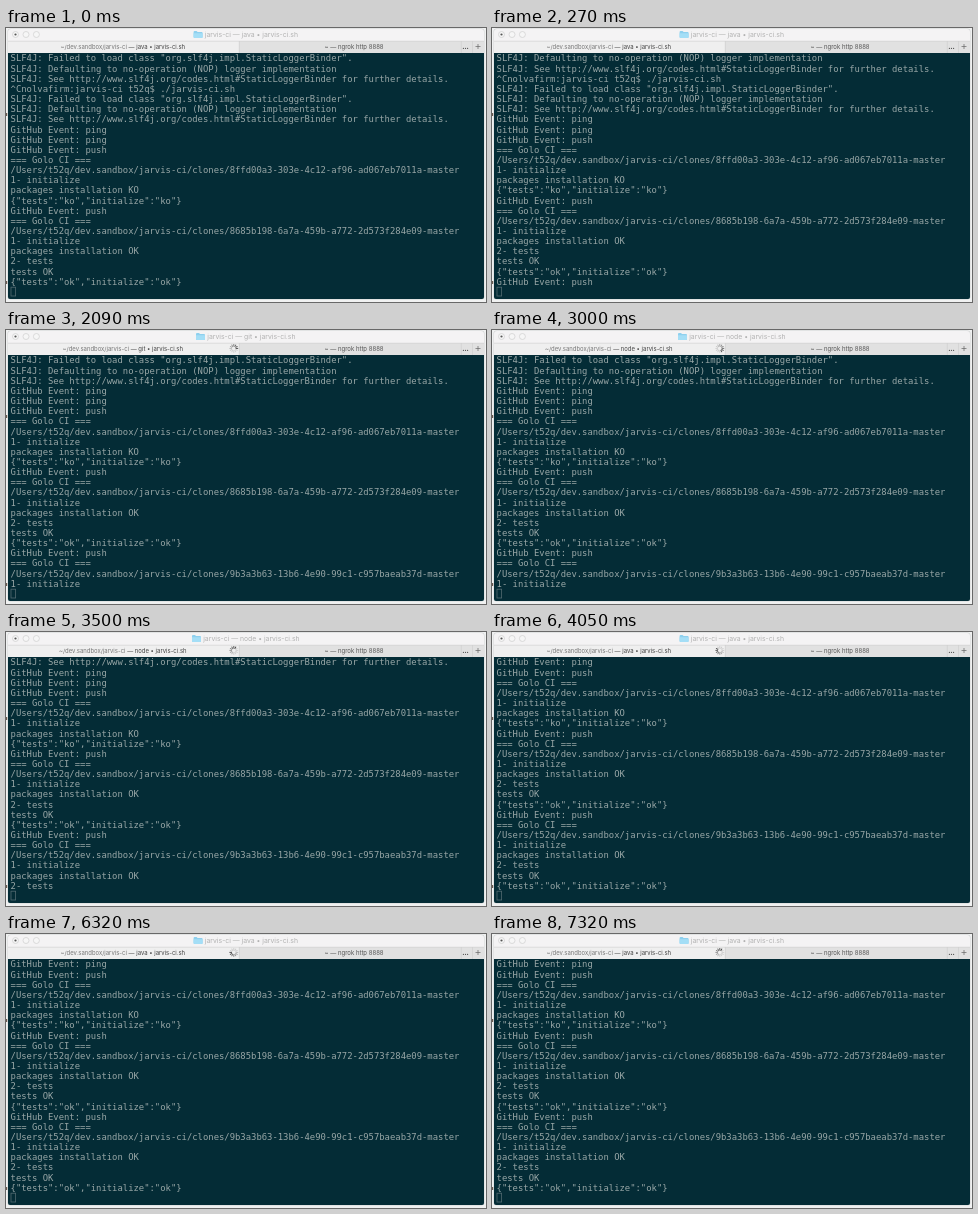
These frames come from a looping animation (480x274 px, 7370 ms). An HTML page:

```html
<!DOCTYPE html>
<html lang="en">
<head>
<meta charset="utf-8">
<title>Terminal</title>
<style>
  html, body { margin: 0; width: 100%; height: 100%; overflow: hidden; background: #f0f1f1; }
  svg { display: block; width: 480px; height: 274px; }
  .ui { font-family: Inter, "Liberation Sans", sans-serif; text-anchor: middle; }
  .mono { font: 8.88px "DejaVu Sans Mono", monospace; fill: #99a7a7; }
</style>
</head>
<body>
<svg id="stage" viewBox="0 0 480 274">
  <rect width="480" height="274" fill="#f0f1f1"/>
  <rect x="1.5" y="0.5" width="477" height="271" rx="3" fill="#d3d6d6"/>
  <path d="M0 85h1.2v3H0zM0 253h1.2v3H0z" fill="#6b5a50"/>
  <path d="M2 14V4q0-3 3-3h470q3 0 3 3v10z" fill="#f4f3f4"/>
  <g id="lights" fill="#f6f6f6" stroke="#cfcfcf" stroke-width=".7"></g>
  <circle cx="9.5" cy="6.5" r="1.1" fill="#555"/>
  <rect x="2" y="13" width="476" height="12" fill="#e1e1e1"/>
  <rect x="2" y="13" width="231" height="12" fill="#efefef"/>
  <path d="M2 13.2H478M233.3 13V25M455.3 13V25M466.5 13V25" stroke="#cdcdcd" stroke-width=".6"/>
  <path d="M2 25H478V269q0 2-2 2H4q-2 0-2-2z" fill="#042c36"/>
  <g id="folder">
    <path d="M0 1q0-1 1-1h2l1 1h4q1 0 1 1v4q0 1-1 1H1q-1 0-1-1z" fill="#8ed0ee"/>
    <path d="M0 2.2h9V6q0 1-1 1H1q-1 0-1-1z" fill="#a4def6"/>
  </g>
  <text id="title" class="ui" x="245.4" y="9" font-size="6.85" fill="#b2b2b2"></text>
  <text class="ui" x="116.8" y="20.9" font-size="5.95" fill="#444"><tspan fill="#777">~/dev.sandbox/jarvis-ci</tspan><tspan id="tab"></tspan></text>
  <text class="ui" x="348.1" y="20.9" font-size="6" fill="#555">~ — ngrok http 8888</text>
  <g fill="#444">
    <circle cx="457.4" cy="20.3" r=".6"/><circle cx="459.5" cy="20.3" r=".6"/><circle cx="461.6" cy="20.3" r=".6"/>
  </g>
  <path d="M469.5 18.5h5M472 16v5" stroke="#666" stroke-width=".7"/>
  <g id="spinner" transform="translate(227.8 18.4)" stroke="#333" stroke-width=".95" stroke-linecap="round"></g>
  <g id="screen" class="mono"></g>
  <rect x="5" y="259.2" width="4.6" height="8.8" fill="none" stroke="#526a70" stroke-width=".8"/>
</svg>
<script>
const LOOP = 7370;
const ROWS = 23;
const ROW_HEIGHT = 10.15;
const SPOKES = 12;
const SPOKE_TIME = 64.2;
const SPOKE_OFFSET = 7;

const logger = [
  'SLF4J: Failed to load class "org.slf4j.impl.StaticLoggerBinder".',
  'SLF4J: Defaulting to no-operation (NOP) logger implementation',
  'SLF4J: See http://www.slf4j.org/codes.html#StaticLoggerBinder for further details.'
];
const event = name => `GitHub Event: ${name}`;
const build = id => [
  '=== Golo CI ===',
  `/Users/t52q/dev.sandbox/jarvis-ci/clones/${id}-master`,
  '1- initialize'
];
const result = state => `{"tests":"${state}","initialize":"${state}"}`;
const passed = ['packages installation OK', '2- tests', 'tests OK', result('ok')];

const log = [
  ...logger,
  '^Cnolvafirm:jarvis-ci t52q$ ./jarvis-ci.sh',
  ...logger,
  event('ping'), event('ping'), event('push'),
  ...build('8ffd00a3-303e-4c12-af96-ad067eb7011a'),
  'packages installation KO', result('ko'),
  event('push'),
  ...build('8685b198-6a7a-459b-a772-2d573f284e09'),
  ...passed,
  event('push'),
  ...build('9b3a3b63-13b6-4e90-99c1-c957baeab37d'),
  ...passed
];

// Each track lists [start time, value] in order.
const scrollTrack = [[0, 0], [140, 1], [1000, 4], [3140, 6], [3800, 8]];
const titleTrack = [[0, 'java'], [1000, 'git'], [2200, 'node'], [3800, 'java']];
const tabTrack = [[0, 'java'], [1000, 'git'], [2550, 'node'], [3800, 'java']];
const spinnerTrack = [[0, false], [320, true]];
const valueAt = (track, time) => track.filter(([start]) => start <= time).pop()[1];

const byId = id => document.getElementById(id);
function add(parent, tag, attributes) {
  const node = document.createElementNS('http://www.w3.org/2000/svg', tag);
  for (const name in attributes) node.setAttribute(name, attributes[name]);
  return parent.appendChild(node);
}
function setText(node, text) {
  if (node.textContent !== text) node.textContent = text;
}

const title = byId('title');
const tab = byId('tab');
const folder = byId('folder');
const spinner = byId('spinner');

for (const cx of [9.5, 20, 30.4]) add(byId('lights'), 'circle', { cx, cy: 6.5, r: 3 });

const rows = Array.from({ length: ROWS }, (_, i) =>
  add(byId('screen'), 'text', { x: 4.6, y: 33.45 + i * ROW_HEIGHT }));

const spokes = Array.from({ length: SPOKES }, (_, i) =>
  add(spinner, 'path', { d: 'M0-2.2V-4', transform: `rotate(${i * 360 / SPOKES})` }));

function render(time) {
  const top = valueAt(scrollTrack, time);
  rows.forEach((row, i) => setText(row, log[top + i]));

  const running = process => ` — ${process} • jarvis-ci.sh`;
  const process = valueAt(titleTrack, time);
  setText(title, 'jarvis-ci' + running(process));
  setText(tab, running(valueAt(tabTrack, time)));
  const folderX = { java: 187.6, git: 190, node: 186 }[process];
  folder.setAttribute('transform', `translate(${folderX} 3)`);

  spinner.setAttribute('visibility', valueAt(spinnerTrack, time) ? 'visible' : 'hidden');
  const head = (Math.floor(time / SPOKE_TIME) + SPOKE_OFFSET) % SPOKES;
  spokes.forEach((spoke, i) => {
    const age = (head - i + SPOKES) % SPOKES;
    spoke.setAttribute('opacity', Math.max(0.18, 0.9 - age * 0.1));
  });
}

function tick() {
  render(performance.now() % LOOP);
  requestAnimationFrame(tick);
}
tick();
</script>
</body>
</html>
```
